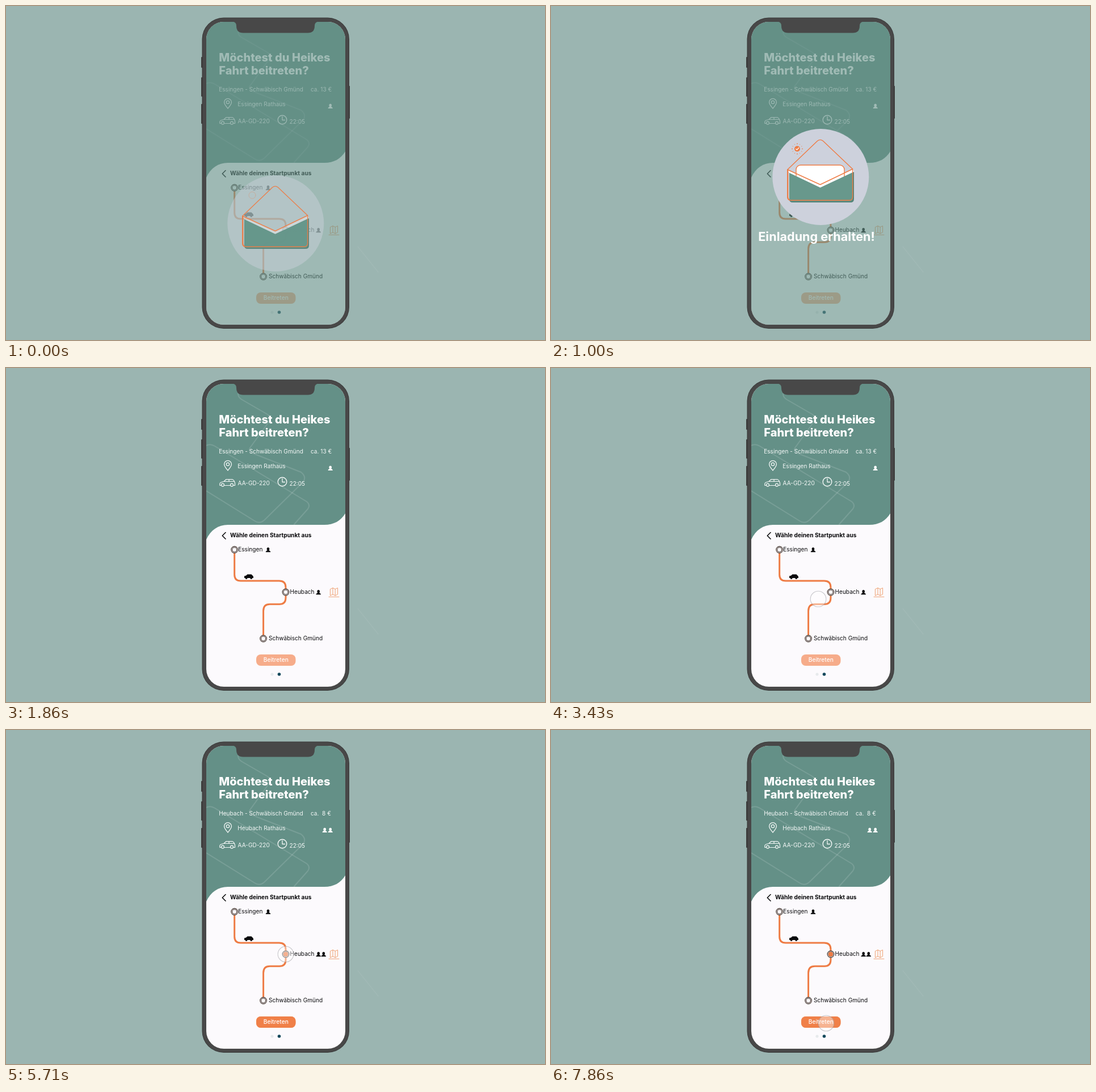
An HTML page with a canvas for the animation above (8 s loop, 950 px wide and 590 px high).

```html
<!DOCTYPE html>
<html lang="de">
<head>
<meta charset="utf-8">
<title>Mitfahrt</title>
<style>
html, body { margin: 0; width: 100%; height: 100%; overflow: hidden; background: #9bb5b1; }
canvas { display: block; width: 950px; height: 590px; }
</style>
</head>
<body>
<canvas id="stage" width="950" height="590"></canvas>
<script>
const c = document.getElementById('stage').getContext('2d');
const LOOP = 8000, STEP = 1000 / 7;
const GREEN = '#649087', ORANGE = '#ee7c45', FRAME = '#484848', PAGE = '#fcfafd', INK = '#0b0b0d';

const clamp = v => Math.max(0, Math.min(1, v));
const ramp = (t, a, b) => clamp((t - a) / (b - a));
const smooth = p => p * p * (3 - 2 * p);
const easeOut = p => 1 - (1 - p) ** 3;
const mix = (a, b, p) => a + (b - a) * p;

function withAlpha(a, draw) {
  if (a <= 0) return;
  c.save();
  c.globalAlpha *= a;
  draw();
  c.restore();
}
function text(s, x, y, color, size = 10.1, weight = 400, align = 'left') {
  c.font = `${weight} ${size}px Inter, sans-serif`;
  c.textAlign = align;
  c.fillStyle = color;
  c.fillText(s, x, y);
}
function stroke(d, color, width = 1.3) {
  c.strokeStyle = color;
  c.lineWidth = width;
  c.stroke(new Path2D(d));
}
function fill(d, color) {
  c.fillStyle = color;
  c.fill(new Path2D(d));
}
function box(x, y, w, h, r, color) {
  c.beginPath();
  c.roundRect(x, y, w, h, r);
  c.fillStyle = color;
  c.fill();
}
function disc(x, y, r, color) {
  c.beginPath();
  c.arc(x, y, r, 0, 7);
  c.fillStyle = color;
  c.fill();
}
function ring(x, y, r, color, width = 1.2) {
  c.beginPath();
  c.arc(x, y, r, 0, 7);
  c.strokeStyle = color;
  c.lineWidth = width;
  c.stroke();
}
function person(x, y, color) {
  c.beginPath();
  c.ellipse(x, y - 1.6, 2.3, 2.7, 0, 0, 7);
  c.fillStyle = color;
  c.fill();
  fill(`M${x - 4} ${y + 4}V${y + 2.9}Q${x - 3.5} ${y + 1.6} ${x - 1} ${y + .8}H${x + 1}Q${x + 3.5} ${y + 1.6} ${x + 4} ${y + 2.9}V${y + 4}Z`, color);
}
function station(x, y) {
  disc(x, y, 6.2, PAGE);
  ring(x, y, 5.9, '#43352f', 1.1);
  ring(x, y, 4, '#43352f', 1.1);
}

function shell() {
  c.fillStyle = '#9bb5b1';
  c.fillRect(0, 0, 950, 590);
  stroke('M620 425L656 470', 'rgba(255,255,255,.06)', 1.5);
  for (const [x, y, h] of [[344, 90, 19], [344, 126, 34], [344, 173, 35], [602, 141, 58]])
    box(x, y, 4, h, 1, '#3d3d3d');
  box(345.5, 20.5, 259.5, 549.5, 38, '#383838');
  box(346.5, 21.5, 257.5, 547.5, 37, FRAME);
}

function header() {
  fill('M353 28H598V257C590 270 578 277 561 277H391C374 277 361 286 353 303Z', GREEN);
  const line = 'rgba(255,255,255,.13)';
  stroke('M409 45Q409 52 416 56L461 82Q468 87 464 94L430 141Q427 147 433 150L520 184Q530 192 524 201L455 269Q447 276 438 270L353 217', line, 2);
  stroke('M353 137Q360 133 368 138L530 236Q537 242 532 249L508 276', line, 2);
  text('Möchtest du Heikes', 375.3, 97.7, '#fff', 20, 800);
  text('Fahrt beitreten?', 375.3, 121.3, '#fff', 20, 800);

  const w = '#f4f8f7';
  stroke('M391 181C387 176 384.6 173.6 384.6 170A6.4 6.4 0 0 1 397.4 170C397.4 173.6 395 176 391 181Z', w);
  ring(391, 170, 2.7, w);
  stroke('M379 207.5H377Q376 203 379 202L384 200.5L388 196.8H399Q402 198 403.5 203V207.5H401M385 207.5H395M384 200.5H402M393 197V200', w, 1.2);
  ring(382, 206.6, 2.5, w);
  ring(398, 206.6, 2.5, w);
  ring(487, 201, 7.8, w, 1.4);
  stroke('M487 195.5V201.5H491.5', w);
  text('AA-GD-220', 408.6, 207.2, w);
  text('22:05', 499.5, 207.6, w);
  person(571.7, 177, '#fff');
}

// Trip details before and after choosing the stop
function trip(town, price) {
  text(town + ' - Schwäbisch Gmünd', 375.2, 151, '#f4f8f7');
  text('ca. ' + price + ' €', 537, 151, '#f4f8f7');
  text(town + ' Rathaus', 408.3, 176.8, '#f4f8f7');
}

function route(k) {
  stroke('M387 290.5L381.3 296.2L387 302', INK, 1.6);
  text('Wähle deinen Startpunkt aus', 395, 299.4, INK, 10.2, 700);
  stroke('M402.7 322V365Q402.7 376 413.5 376H481.5Q493 376 493 387.5V406Q493 417.3 482 417.3H465Q453.6 417.3 453.6 429V477', ORANGE, 3);
  station(402.7, 321);
  station(493, 396);
  station(453.6, 478);
  withAlpha(k, () => disc(493, 396, 4, ORANGE));
  text('Essingen', 409.2, 324, INK);
  text('Heubach', 500.5, 398.6, INK);
  text('Schwäbisch Gmünd', 463, 481, INK);
  person(462, 321.3, INK);
  person(550.7, 396.3, INK);
  withAlpha(k, () => person(559.8, 396.3, INK));

  fill('M420 371V367.6L423 366.8L425.5 364.6H432.5L435 367Q436.5 368 436 371H420Z', INK);
  disc(423.6, 371, 1.9, INK);
  disc(432.2, 371, 1.9, INK);

  const o = '#efa172';
  stroke('M571.8 390.5L576 388.5L580.2 390.5L584.6 388.5V399.8L580.2 402L576 399.8L571.8 402ZM576 388.5V399.8M580.2 390.5V402', o, 1);
  stroke('M569 404.3H587', o, 1);
}

function footer(k) {
  box(441, 506, 69.5, 20, 8, '#f6ac8a');
  withAlpha(k, () => box(441, 506, 69.5, 20, 8, '#f08048'));
  text('Beitreten', 475.8, 519.3, '#fff', 10.2, 500, 'center');
  disc(469, 541, 2.6, '#e7eaec');
  disc(481.5, 541, 2.8, '#14495c');
}

function badge() {
  disc(434, 252.3, 5, ORANGE);
  stroke('M431.6 252.3L433.5 254.2L436.6 250.5', '#fff', 1.2);
  for (let i = 0; i < 12; i++) {
    const a = i * Math.PI / 6;
    disc(434 + 9 * Math.cos(a), 252.3 + 9 * Math.sin(a), i % 3 ? .6 : .9, ORANGE);
  }
}

function envelope(paper) {
  withAlpha(.35 + .65 * paper, () => fill('M417 289L474.5 315L532 288L534 293L474.5 321L420 295Z', '#fff'));
  withAlpha(paper, () => {
    c.save();
    c.clip(new Path2D('M416 230H535V293L474.5 321L420 295H416Z'));
    const y = mix(322, 281, paper);
    box(432, y, 85, 60, 8, '#fff');
    c.strokeStyle = ORANGE;
    c.lineWidth = 1.4;
    c.stroke();
    c.restore();
  });
  fill('M420 295L474.5 321L534 293V341Q534 347 528 347H426Q420 347 420 341Z', '#558377');
  fill('M420 295L474.5 321L532 294V339Q532 345 526 345H426Q420 345 420 339Z', '#68988c');
  stroke('M416.8 289V337Q416.8 343.3 423 343.3H525.5Q531.6 343.3 531.6 337V288L479.3 238.3Q474.5 234.5 469.7 238.3Z', ORANGE, 1.4);
  stroke('M416.8 289L474.5 315.5L531.6 288', ORANGE, 1.4);
  stroke('M417.3 290V337Q417.3 341 420 342.5', ORANGE, 2);
}

function invitation(t) {
  withAlpha(.61 * (1 - ramp(t, 1540, 1850)), () => {
    c.fillStyle = GREEN;
    c.fillRect(350, 25, 252, 542);
  });
  if (t > 1700) return;
  const enter = ramp(t, 0, 285), leave = ramp(t, 1250, 1640);
  const shift = 82 * (1 - easeOut(enter)) + 278 * leave * leave;
  const round = mix(.45, 1, ramp(t, 0, 200)) * (1 - ramp(t, 1250, 1520));
  const body = mix(.92, 1, enter) * mix(1, .38, ramp(t, 1290, 1571));
  const paper = smooth(ramp(t, 20, 285)) * (1 - smooth(ramp(t, 1200, 1520)));
  c.save();
  c.translate(0, shift);
  withAlpha(round, () => disc(475.3, 302, 85, '#cdd1dc'));
  withAlpha(body, () => envelope(paper));
  withAlpha(paper, badge);
  withAlpha((1 - enter) * .3, () => ring(434, 252.3, 6, ORANGE, 1));
  c.restore();
  withAlpha(ramp(t, 80, 285) * (1 - ramp(t, 1250, 1480)), () =>
    text('Einladung erhalten!', 468, 415.3, '#fff', 21.6, 700, 'center'));
}

function pointer(t) {
  const a = smooth(ramp(t, 3000, 4000)), b = smooth(ramp(t, 6500, 7600));
  const x = mix(mix(456.8, 493, a), 485, b);
  const y = mix(mix(415.8, 396, a), 518, b);
  withAlpha(ramp(t, 2900, 3200), () => {
    disc(x, y, 14, 'rgba(255,255,255,.4)');
    ring(x, y, 13.8, 'rgba(150,150,155,.5)', 1.1);
  });
}

function draw(t) {
  const k = ramp(t, 4500, 4900);
  shell();
  c.save();
  c.beginPath();
  c.roundRect(353, 28, 245, 535, 31);
  c.clip();
  c.fillStyle = PAGE;
  c.fillRect(350, 25, 252, 542);
  header();
  withAlpha(1 - k, () => trip('Essingen', '13'));
  withAlpha(k, () => {
    trip('Heubach', ' 8');
    person(561.7, 177, '#fff');
  });
  route(k);
  footer(k);
  invitation(t);
  pointer(t);
  c.restore();
  fill('M399 27.5Q406 28 406 35Q406 47.5 418 47.5H532Q544 47.5 544 35Q544 28 551 27.5Z', FRAME);
}

c.lineCap = c.lineJoin = 'round';
const start = performance.now();
function tick() {
  const t = (performance.now() - start) % LOOP;
  draw(Math.floor((t + 6) / STEP) * STEP);
  requestAnimationFrame(tick);
}
tick();
</script>
</body>
</html>
```
